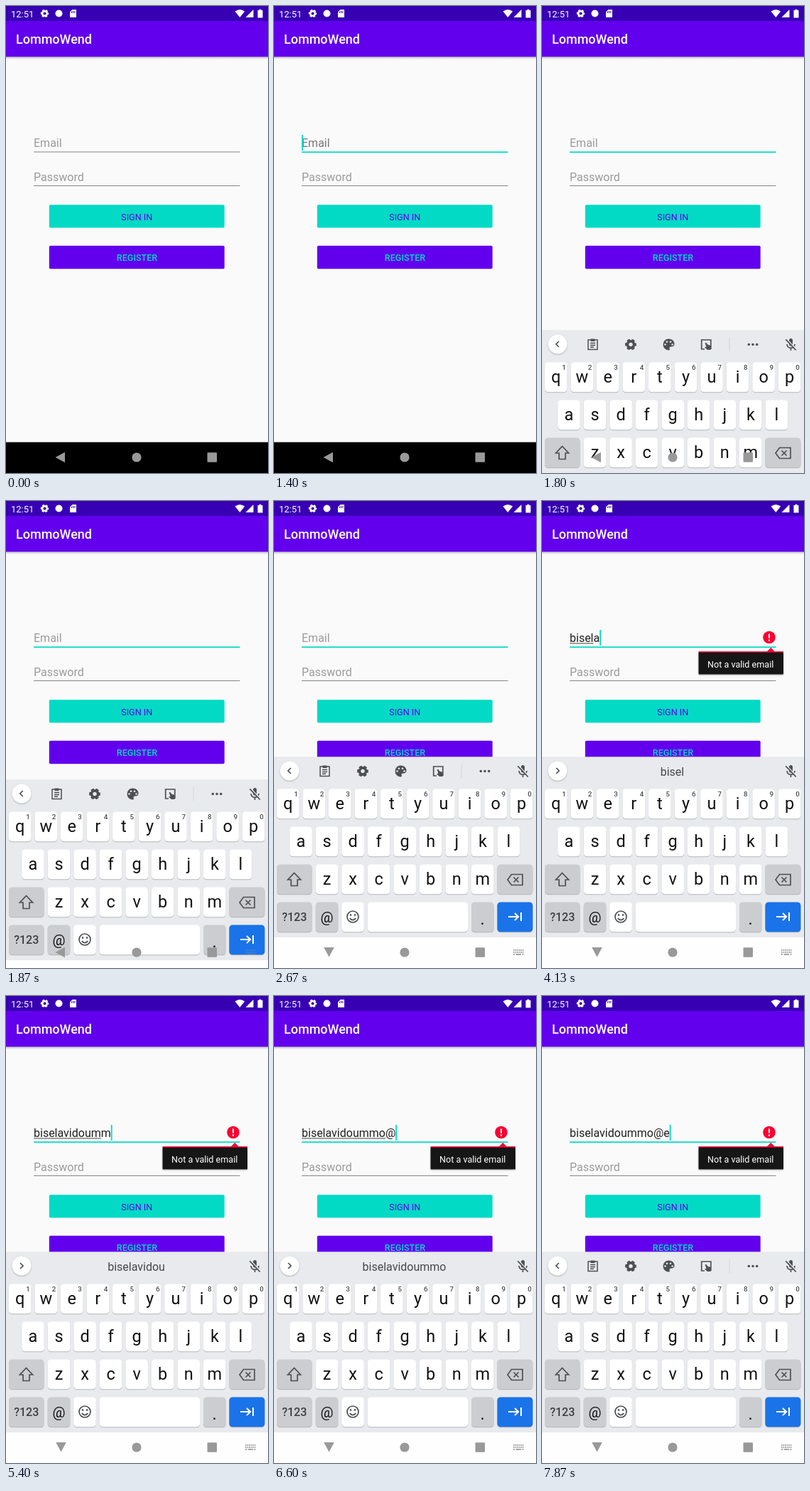
These frames come from a looping animation (369 px wide and 656 px high, 8 s). An HTML page:

```html
<!DOCTYPE html>
<html lang="en">
<head>
<meta charset="utf-8">
<title>Sign in form</title>
<style>
html, body { margin: 0; width: 100%; height: 100%; overflow: hidden; background: #fafafa; }
svg { display: block; width: 369px; height: 656px; font-family: Roboto, "Open Sans", sans-serif; }
.mid { text-anchor: middle; }
.line { fill: none; stroke: #4c5053; stroke-width: 1.7; }
</style>
</head>
<body>
<svg id="stage" viewBox="0 0 369 656">
  <defs>
    <linearGradient id="shade" x2="0" y2="1">
      <stop stop-color="#000" stop-opacity=".25"/><stop offset="1" stop-color="#000" stop-opacity="0"/>
    </linearGradient>
    <g id="gear" fill="none">
      <circle r="4.6" stroke-width="3.6"/>
      <circle r="6.8" stroke-width="2.2" stroke-dasharray="4.4 2.72" stroke-dashoffset="2.2"/>
    </g>
    <filter id="soft" x="-20%" y="-30%" width="140%" height="170%">
      <feDropShadow dx="0" dy="1" stdDeviation="1.2" flood-opacity=".3"/>
    </filter>
  </defs>

  <rect width="369" height="656" fill="#fafafa"/>
  <rect y="71" width="369" height="4" fill="url(#shade)"/>
  <rect y="21" width="369" height="50.3" fill="#6200ee"/>
  <rect width="369" height="21" fill="#3700b3"/>
  <g fill="#fff">
    <text x="7" y="15.5" font-size="13">12:51</text>
    <text x="14" y="53" font-size="18" font-weight="500">LommoWend</text>
    <use href="#gear" stroke="#fff" transform="translate(54.5 10.5) scale(.72)"/>
    <circle cx="74.5" cy="10.5" r="5"/>
    <path d="M93.5 5H99V16H90V8.500Z"/>
    <path d="M92.500 7.500v2.500M94.700 7v3M96.900 7v3" stroke="#3700b3"/>
    <path d="M322.500 7.500Q329.300 2.500 336.200 7.500L329.300 16Z"/>
    <path d="M348.500 5V16H337.500Z"/>
    <path d="M354.500 6H356.500V4.700H359.500V6H361.500V16.500H354.500Z"/>
  </g>

  <text id="hint" x="39" y="198" font-size="16">Email</text>
  <text id="entry" x="39" y="198" font-size="16" fill="#212121"></text>
  <rect id="spell" x="39" y="199.500" height="1" fill="#444"/>
  <rect id="rule" x="39" width="290.500"/>
  <rect id="caret" y="181" width="1.800" height="22" fill="#03dac5"/>
  <text x="39" y="245.500" font-size="16" fill="#9b9b9b">Password</text>
  <rect x="39" y="252" width="290.500" height="1" fill="#858585"/>
  <rect x="60.800" y="279.300" width="246.900" height="32.300" rx="1.800" fill="#03dac5"/>
  <rect x="60.800" y="336.800" width="246.900" height="32.500" rx="1.800" fill="#6200ee"/>
  <g class="mid" font-size="12.6">
    <text x="184.200" y="300.500" fill="#6200ee">SIGN IN</text>
    <text x="184.500" y="357.800" fill="#03dac5" font-weight="500">REGISTER</text>
  </g>

  <g id="error">
    <circle cx="320" cy="191.500" r="8.800" fill="#fb0030"/>
    <path d="M320 186.500V192.700M320 194.500V196.700" stroke="#fff" stroke-width="2"/>
    <rect x="220.500" y="212" width="119.500" height="31.500" rx="1" fill="#131313" filter="url(#soft)"/>
    <path d="M220.500 212.800V211.200H317L322.300 206L327.500 211.200H340V212.800Z" fill="#fb0030"/>
    <text x="233" y="234" font-size="12.6" fill="#fff">Not a valid email</text>
  </g>

  <rect y="612.700" width="369" height="44" fill="#000"/>

  <g id="board">
    <rect y="359.300" width="369" height="254" fill="#e8eaed"/>
    <rect y="613" width="369" height="300" fill="#fefefe"/>
    <circle cx="22" cy="379" r="13.300" fill="#fff" filter="url(#soft)"/>
    <path id="chevron" class="line" d="M23.800 375L19.800 379L23.800 383"/>
    <g id="tools" class="line">
      <path d="M65 373H78V386.500H65ZM68 377.500H75M68 380.500H75M68 383.300H73" stroke-width="1.500"/>
      <path d="M68.500 373.300H74.500" stroke-width="3.500"/>
      <use href="#gear" stroke="#4c5053" transform="translate(125 379.500)"/>
      <path d="M178.500 371.500A8 8 0 1 0 178.500 387.500C181 387.500 179.500 385 179.500 384C179.500 382.500 182 382.500 183.500 382.500C189 381.500 187 371.500 178.500 371.500Z" fill="#4c5053" stroke="none"/>
      <g fill="#e8eaed" stroke="none">
        <circle cx="173.500" cy="379.500" r="1.300"/><circle cx="176" cy="375.700" r="1.300"/>
        <circle cx="181" cy="375.700" r="1.300"/><circle cx="183.600" cy="379.500" r="1.300"/>
      </g>
      <path d="M229 386H224.700V373H237.800V386"/>
      <path d="M229.500 377.500L231.500 377L233 379.500L237.500 381V387H233L229 383.500L231.500 382.500Z" fill="#4c5053" stroke="none"/>
      <path d="M264 370V389" stroke="#d0d2d5" stroke-width="1"/>
      <path d="M291.300 379.500H302.800" stroke-width="3.600" stroke-linecap="round" stroke-dasharray="0 5.700"/>
    </g>
    <text id="suggest" class="mid" x="183.500" y="385.500" font-size="16" fill="#44484b"></text>
    <g class="line">
      <path d="M350.500 373.500V379" stroke-width="5" stroke-linecap="round"/>
      <path d="M345 379Q345.500 384.300 350.500 384.300Q355.500 384.300 356 379M350.500 384.300V388"/>
      <path d="M344.500 371.500L358.500 386.500" stroke="#e8eaed" stroke-width="1.500"/>
      <path d="M343.300 372.300L357.700 387.500"/>
    </g>
    <g id="keys"></g>
    <g class="line">
      <path d="M28.500 522.500L37.500 532H33V540.500H24V532H19.500Z"/>
      <path d="M334.500 524.500H350V539.500H334.500L329 532ZM337.500 528.500L344.500 535.500M344.500 528.500L337.500 535.500"/>
      <circle cx="111" cy="584" r="8"/>
      <path d="M106.700 586.200Q111 591 115.300 586.200" stroke-width="1.900"/>
      <path d="M108 580.200V582.800M114 580.200V582.800" stroke-width="2.200"/>
      <path d="M330 584H344M339 579L344.200 584L339 589M348 578V590" stroke="#fff" stroke-width="2"/>
    </g>
  </g>

  <g fill="#999">
    <path id="back" d="M69.500 634L83 626.700V641.300Z"/>
    <circle cx="184" cy="634" r="6.600"/>
    <rect x="283.500" y="627.300" width="13.500" height="13.500" rx=".8"/>
    <g id="switcher">
      <path d="M337 630.800H351.500M337 633.800H351.500" stroke="#999" stroke-width="1.700" stroke-dasharray="1.700 .85"/>
      <path d="M337 636.800H339M340.500 636.800H348M349.500 636.800H351.500" stroke="#999" stroke-width="1.700"/>
    </g>
  </g>
</svg>
<script>
const el = {};
document.querySelectorAll('svg [id]').forEach(node => el[node.id] = node);
const set = (node, attrs) => {
  for (const name in attrs) node.setAttribute(name, attrs[name]);
};
const show = (node, on) => set(node, { visibility: on ? 'visible' : 'hidden' });

// Keyboard
const PITCH = 36.55, KEY_W = 31.6, KEY_H = 41.8;
const rowY = row => 404.5 + row * 53;
const key = (x, row, w, fill) => [['#b3b5b9', 1], [fill, 0]].map(([color, dy]) =>
  `<rect x="${x}" y="${rowY(row) + dy}" width="${w}" height="${KEY_H}" rx="4.6" fill="${color}"/>`).join('');
const label = (x, y, size, text, extra = '') =>
  `<text class="mid" x="${x}" y="${y}" font-size="${size}" fill="#111" ${extra}>${text}</text>`;

const GREY = '#cbcdd1';
let keys = '';
['qwertyuiop', 'asdfghjkl', 'zxcvbnm'].forEach((letters, row) => {
  [...letters].forEach((letter, i) => {
    const cx = [19.7, 38, 74.5][row] + i * PITCH;
    keys += key(cx - KEY_W / 2, row, KEY_W, '#fff') + label(cx, rowY(row) + 28.5, 23.5, letter);
    if (!row) keys += label(cx + 11.3, 414.7, 9.8, (i + 1) % 10, 'style="fill:#4a4d50" font-weight="500"');
  });
});
keys += key(4, 2, 49.5, GREY) + key(314.4, 2, 50, GREY)
  + key(4, 3, 49.5, GREY) + key(58.7, 3, KEY_W, GREY) + key(95.2, 3, KEY_W, '#fff')
  + key(131.8, 3, 141.2, '#fff') + key(278, 3, KEY_W, GREY) + key(314.4, 3, 50, '#1a73e8')
  + label(28.7, 590, 16, '?123', 'style="fill:#3c4043" font-weight="500"')
  + label(74.4, 591.5, 20, '@') + label(293.7, 594.5, 23.5, '.');
el.keys.innerHTML = keys;

// Timeline in ticks of 1/15 s
const LOOP = 8000;
const ADDRESS = 'biselavidoummo@em';
const TYPED = [50, 53, 55, 57, 59, 62, 67, 70, 71, 74, 78, 79, 81, 85, 99, 108, 110];
const SPELLED = [52, 54, 56, 58, 60, 63, 68, 71, 72, 75, 80, 80, 83, 88];
const SUGGESTED = [52, 55, 57, 59, 61, 64, 68, 72, 72, 75, 80, 83, 85, 88];
const CARET = [[21, 24], [32, 40], [47, 95], [99, 121]];
const ERASE = 118;

const clamp = v => Math.max(0, Math.min(1, v));
const countUntil = (ticks, now) => ticks.filter(tick => tick <= now).length;
const within = (now, [from, to]) => now >= from && now < to;

function render(time) {
  const tick = Math.floor(time * 0.015 + 0.1);
  const focused = tick >= 21;

  const length = countUntil(TYPED, tick) - (tick >= ERASE ? 1 : 0);
  el.entry.textContent = ADDRESS.slice(0, length);
  const end = length ? el.entry.getComputedTextLength() : 0;
  show(el.hint, !length);
  set(el.hint, { fill: within(tick, [21, 24]) ? '#787878' : '#9b9b9b' });
  set(el.rule, focused
    ? { y: 204.4, height: 1.8, fill: '#03dac5' }
    : { y: 204.5, height: 1, fill: '#858585' });
  set(el.caret, { x: 39 + end });
  show(el.caret, CARET.some(span => within(tick, span)));

  const spelled = tick < 102 ? countUntil(SPELLED, tick) : 0;
  set(el.spell, { width: spelled ? el.entry.getSubStringLength(0, spelled) : 0 });
  show(el.error, length > 0);

  const suggesting = within(tick, [52, 103]);
  el.suggest.textContent = suggesting ? ADDRESS.slice(0, countUntil(SUGGESTED, tick)) : '';
  show(el.tools, !suggesting);
  set(el.chevron, { transform: suggesting ? 'rotate(180 21.9 379)' : '' });

  const rise = clamp((tick / 0.015 - 1700) / 320);
  set(el.board, { transform: `translate(0 ${Math.floor(297 * (1 - rise) ** 3)})` });
  show(el.board, rise > 0);
  const turn = clamp((tick - 28) / 4);
  set(el.back, { transform: `rotate(${-90 * turn} 76.75 633.25)` });
  set(el.switcher, { opacity: tick < 28 ? 0 : 0.35 + 0.65 * turn });
}

const start = performance.now();
function frame() {
  render((performance.now() - start) % LOOP);
  requestAnimationFrame(frame);
}
render(0);
requestAnimationFrame(frame);
</script>
</body>
</html>
```
